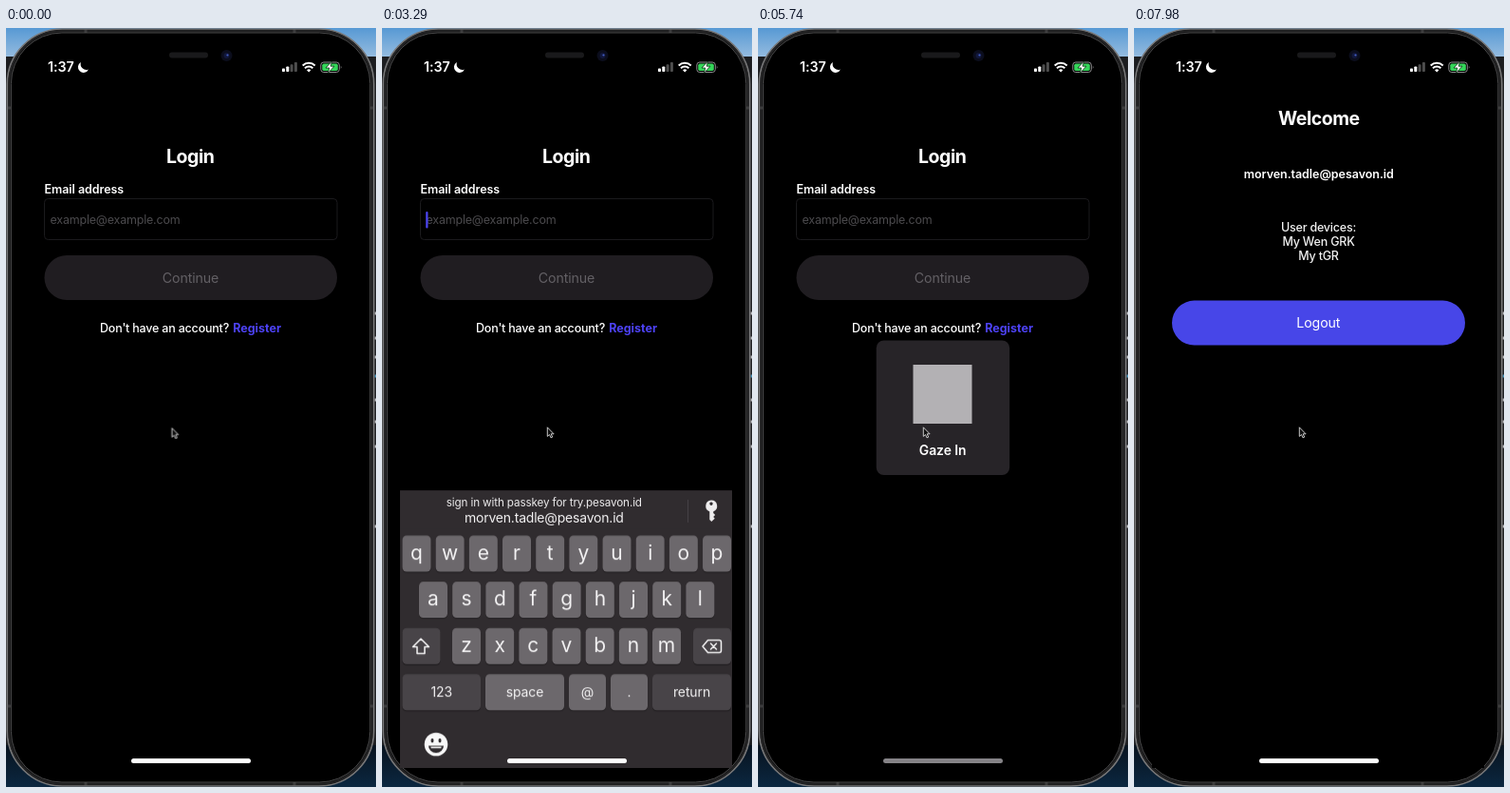
Animation of 390x798 px, one loop 8000 ms. Source, as an HTML page:

```html
<!DOCTYPE html>
<html lang="en">
<head>
<meta charset="utf-8">
<title>Passkey login</title>
<style>
html, body { margin: 0; width: 100%; height: 100%; overflow: hidden; background: #000; }
svg { display: block; width: 100vw; height: 100vh; }
text { font-family: Inter, Roboto, sans-serif; font-size: 12.5px; letter-spacing: -.2px; fill: #fff; }
.mid { text-anchor: middle; }
.title { font-size: 19.5px; font-weight: 700; letter-spacing: -.5px; }
.strong { font-weight: 600; letter-spacing: -.05px; }
.action { font-size: 14.2px; letter-spacing: -.13px; }
.letter { font-size: 21px; letter-spacing: 0; fill: #f4f3f4; }
.word { font-size: 14px; letter-spacing: -.1px; fill: #f4f3f4; }
.line { fill: none; stroke: #f4f3f4; stroke-width: 1.5; stroke-linejoin: round; stroke-linecap: round; }

/* 1% = 80 ms */
.anim { animation: 8s linear infinite; }
#board { animation-name: board; }
#hint { animation-name: hint; }
#cover { animation-name: cover; }
#caret { animation-name: caret; animation-timing-function: step-end; }
#login { animation-name: login; }
#welcome { animation-name: welcome; }
#prompt { animation-name: prompt; transform-origin: 195px 399.3px; }
#scan { animation-name: scan; }
#done { animation-name: done; }
#tick { stroke-dasharray: 42; animation-name: tick; }
#home { animation-name: home; }
#pointer { animation-name: pointer; animation-timing-function: step-end; }

@keyframes board {
  0%, 36.82% { transform: translateY(320px); animation-timing-function: cubic-bezier(.2,.56,.2,1); }
  43.07%, 60.375% { transform: none; animation-timing-function: cubic-bezier(.3,.2,.2,1); }
  65.6%, 100% { transform: translateY(320px); }
}
@keyframes hint {
  0%, 38.5% { transform: translateY(-5px); }
  42%, 100% { transform: none; }
}
@keyframes cover {
  0%, 38.5% { transform: none; }
  42%, 100% { transform: translateY(14px); }
}
@keyframes caret {
  0% { opacity: 0; }
  36.5% { opacity: 1; }
  60.375%, 100% { opacity: 0; }
}
@keyframes login {
  0%, 77.65% { transform: none; animation-timing-function: cubic-bezier(.2,.56,.2,1); }
  83.9%, 100% { transform: translateX(-105px); }
}
@keyframes welcome {
  0%, 77.65% { transform: translateX(350px); animation-timing-function: cubic-bezier(.2,.56,.2,1); }
  83.9%, 100% { transform: none; }
}
@keyframes prompt {
  0%, 65% { opacity: 0; transform: scale(.9); animation-timing-function: ease-out; }
  68%, 82.6% { opacity: 1; transform: none; }
  83.125% { opacity: 1; transform: scale(.99); animation-timing-function: ease-in; }
  86%, 100% { opacity: 0; transform: scale(.92); }
}
@keyframes scan {
  0%, 75% { opacity: 1; }
  76.5%, 100% { opacity: 0; }
}
@keyframes done {
  0%, 75.4% { opacity: 0; }
  77%, 100% { opacity: 1; }
}
@keyframes tick {
  0%, 76% { stroke-dashoffset: 42; }
  79%, 100% { stroke-dashoffset: 0; }
}
@keyframes home {
  0%, 65% { fill: #fff; }
  68%, 83.2% { fill: #858387; }
  87%, 100% { fill: #fff; }
}
@keyframes pointer {
  0% { transform: translate(.6px, .7px); }
  13.125%, 100% { transform: none; }
}
</style>
</head>
<body>
<svg viewBox="0 0 390 798" preserveAspectRatio="none">
  <defs>
    <linearGradient id="sky" x2="0" y2="1">
      <stop offset="0" stop-color="#5799d4"/><stop offset="1" stop-color="#94bbdf"/>
    </linearGradient>
    <linearGradient id="sea" x2="0" y2="1">
      <stop offset="0" stop-color="#08131f"/><stop offset="1" stop-color="#0b2740"/>
    </linearGradient>
    <clipPath id="screen"><rect x="19" y="18" width="350" height="760"/></clipPath>
  </defs>

  <!-- desktop -->
  <rect width="390" height="798" fill="#1c1d20"/>
  <rect width="390" height="30" fill="url(#sky)"/>
  <rect y="754" width="390" height="44" fill="url(#sea)"/>
  <path d="M388.5 300h1.5M388.5 326h1.5M388.5 346h1.5M388.5 391h1.5M388.5 414h1.5M388.5 440h1.5M388.5 524h1.5" stroke="#b9babd" stroke-width="3"/>
  <path d="M388.5 366h1.5" stroke="#3f8fb8" stroke-width="3"/>

  <!-- phone -->
  <rect x="1.3" y="1" width="386.4" height="796" rx="58" fill="#111112" stroke="#777778" stroke-width="1.7"/>
  <rect x="3.2" y="3" width="382.6" height="792" rx="56" fill="none" stroke="#262627" stroke-width="1.6"/>
  <rect x="5.4" y="5" width="378.4" height="788" rx="53.5" fill="#000" stroke="#4a4a4b"/>
  <path d="M1 84h4M384 84h4M1 713h4M384 713h4M84 1v4M304 1v4M84 793v4M304 793v4" stroke="#6d6d6e" stroke-width="3" opacity=".35"/>

  <g clip-path="url(#screen)">
    <g id="login" class="anim">
      <text class="mid title" x="194.2" y="141.6">Login</text>
      <text class="strong" x="40.5" y="174.4">Email address</text>
      <rect x="40.5" y="179.5" width="308.5" height="43" rx="4" fill="none" stroke="#1b1a1d"/>
      <text x="46.5" y="205.8" style="fill:#4b4a4d">example@example.com</text>
      <rect id="caret" class="anim" x="46.2" y="193" width="2.3" height="17.5" rx="1" fill="#4a43ee"/>
      <rect x="40.5" y="239" width="308.5" height="47" rx="23.5" fill="#201d21"/>
      <text class="mid action" x="194.5" y="267.6" style="fill:#636065">Continue</text>
      <text class="mid" x="194.5" y="319.7" style="font-weight:500">Don't have an account? <tspan dx="1" style="font-weight:700;fill:#4d42f5;letter-spacing:0">Register</tspan></text>
    </g>

    <g id="welcome" class="anim">
      <rect x="19" y="55" width="350" height="723" fill="#000"/>
      <text class="mid title" x="194.8" y="101.7">Welcome</text>
      <text class="mid strong" x="194.8" y="158.2">morven.tadle@pesavon.id</text>
      <g style="opacity:.95;font-weight:500">
        <text class="mid" x="194.5" y="213.5">User devices:</text>
        <text class="mid" x="194.5" y="228.7">My Wen GRK</text>
        <text class="mid" x="194.5" y="243.9">My tGR</text>
      </g>
      <rect x="40" y="286.6" width="309" height="47" rx="23.5" fill="#4746e8"/>
      <text class="mid action" x="194.3" y="315.4">Logout</text>
    </g>

    <g id="board" class="anim">
      <rect x="19" y="477" width="350" height="322" fill="#302c2f"/>
      <g id="hint" class="anim">
        <text class="mid" x="170.8" y="495.3" style="font-size:11.7px;letter-spacing:-.13px;fill:#eeedee">sign in with passkey for try.pesavon.id</text>
        <text class="mid" x="170.8" y="511.6" style="font-size:14px;fill:#f4f3f4">morven.tadle@pesavon.id</text>
        <path d="M322.5 488v24" stroke="#454145"/>
        <path fill="#eeedee" fill-rule="evenodd" d="M347 488.5a6.2 6.2 0 0 1 2.2 12v1.5l2 2-2 2 1.6 1.7-3.5 3.3-2-2v-8.5a6.2 6.2 0 0 1 1.7-12zM347 490.5a1.7 1.7 0 1 0 .01 0z"/>
      </g>
      <rect id="cover" class="anim" x="19" y="507" width="350" height="18" fill="#302c2f"/>
      <g id="keys"></g>
      <path class="line" d="M41 633l8.5 8.5h-4.5v7h-8v-7h-4.5z"/>
      <path class="line" d="M343.5 634.5h12a2 2 0 0 1 2 2v9a2 2 0 0 1-2 2h-12l-5.5-6.5zM346.5 638l6 6M352.5 638l-6 6"/>
      <circle cx="57" cy="744" r="12.3" fill="#f8f8f8"/>
      <path d="M49 745.5h16a8 7.5 0 0 1-16 0z" fill="#302c2f"/>
      <path d="M51.5 747.3h11" stroke="#f8f8f8" stroke-width="1.6"/>
      <ellipse cx="53" cy="740" rx="1.5" ry="2.3" fill="#302c2f"/>
      <ellipse cx="61" cy="740" rx="1.5" ry="2.3" fill="#302c2f"/>
    </g>
  </g>

  <g id="prompt" class="anim">
    <rect x="124.7" y="328.5" width="140.5" height="141.5" rx="8" fill="#272428"/>
    <rect id="scan" class="anim" x="163.5" y="354" width="62" height="62" fill="#b3b1b4"/>
    <g id="done" class="anim" fill="none" stroke="#fff" stroke-width="3.4" stroke-linecap="round" stroke-linejoin="round">
      <circle cx="194.5" cy="385" r="30.3"/>
      <path id="tick" class="anim" d="M183 387l8 10 14.5-21"/>
    </g>
    <text class="mid strong" x="194.7" y="448.5" style="font-size:13.9px">Gaze In</text>
  </g>

  <!-- status bar -->
  <rect x="172" y="25.5" width="41" height="6" rx="3" fill="#19191b"/>
  <circle cx="232.5" cy="29" r="6" fill="#0b0d1c"/>
  <circle cx="232.5" cy="29" r="3" fill="#12183c"/>
  <circle cx="233.5" cy="28.5" r="1.1" fill="#4560c8"/>
  <text class="strong" x="44" y="46.2" style="font-size:14.3px">1:37</text>
  <path d="M79 36a5.8 5.8 0 1 0 8 7.5a6 6 0 0 1-8-7.5z" fill="#fff"/>
  <g fill="#fff">
    <rect x="291" y="42.5" width="3" height="3.5" rx=".8"/>
    <rect x="295.3" y="40.5" width="3" height="5.5" rx=".8"/>
    <rect x="299.6" y="38.3" width="3" height="7.7" rx=".8" opacity=".3"/>
    <rect x="303.9" y="36" width="3" height="10" rx=".8" opacity=".3"/>
  </g>
  <g fill="none" stroke="#fff" stroke-width="2">
    <path d="M312.7 39.5a9.3 9.3 0 0 1 13 0M315 42.2a6 6 0 0 1 8.4 0"/>
    <path d="M319.2 46.5l-2.2-2.3a3.2 3.2 0 0 1 4.4 0z" fill="#fff" stroke="none"/>
  </g>
  <rect x="331.8" y="36" width="19.5" height="10.5" rx="3" fill="#000" stroke="#8c8c8e"/>
  <rect x="333.3" y="37.5" width="16.5" height="7.5" rx="1.7" fill="#35d65a"/>
  <path d="M352.8 39.5q1.6 1.7 0 3.5z" fill="#8c8c8e"/>
  <path d="M343.5 35l-6.5 7h3.8l-1.5 5.5 6.7-7.3h-3.8z" fill="#fff" stroke="#0b3014" stroke-width=".8"/>

  <rect id="home" class="anim" x="132" y="767.9" width="126" height="5.1" rx="2.5" fill="#fff"/>
  <path id="pointer" class="anim" d="M174.3 419.8v9.6l2.2-1.9 1.5 3.3 1.7-.7-1.5-3.3h2.9z" fill="#111" stroke="#dcdcdc" stroke-width=".9"/>
</svg>
<script>
const keys = document.getElementById('keys');

function add(tag, attrs, label) {
  const el = document.createElementNS('http://www.w3.org/2000/svg', tag);
  for (const name in attrs) el.setAttribute(name, attrs[name]);
  if (label) el.textContent = label;
  keys.append(el);
}

function key(x, y, w, label, kind = 'letter', dark = false) {
  add('rect', { x, y: y + 1, width: w, height: 38, rx: 4.5, fill: '#1d1a1c' });
  add('rect', { x, y, width: w, height: 38, rx: 4.5, fill: dark ? '#484448' : '#6c686c' });
  if (label) add('text', { x: x + w / 2, y: y + (kind === 'letter' ? 25 : 24), class: 'mid ' + kind }, label);
}

const pitch = 35.17, top1 = 524.5, rowStep = 48.6;
[['qwertyuiop', 36.5], ['asdfghjkl', 54], ['zxcvbnm', 89]].forEach(([row, x], r) => {
  [...row].forEach((c, i) => key(x + i * pitch - 15, top1 + r * rowStep, 30, c));
});

const top3 = top1 + 2 * rowStep, top4 = top1 + 3 * rowStep;
key(21.5, top3, 40, '', 'word', true);
key(328, top3, 40, '', 'word', true);
key(21.5, top4, 82.5, '123', 'word', true);
key(109, top4, 83, 'space', 'word');
key(197, top4, 39, '@', 'word');
key(241, top4, 39, '.', 'word');
key(285, top4, 83, 'return', 'word', true);
</script>
</body>
</html>
```
